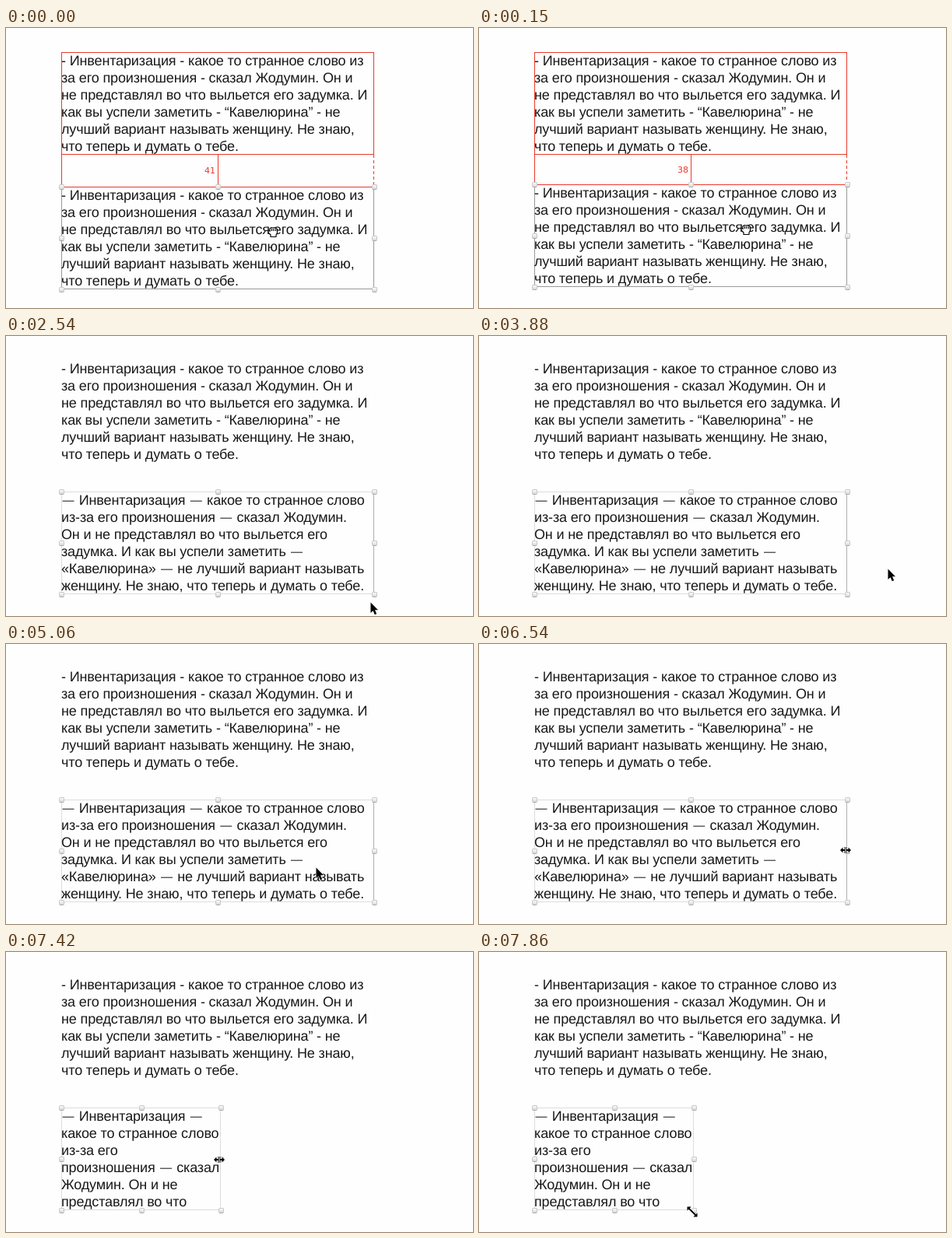
These frames come from a looping animation (600 px wide and 360 px high, 8000 ms). An HTML page:

```html
<!DOCTYPE html>
<html lang="ru">
<head>
<meta charset="utf-8">
<title>Text box</title>
<style>
  html, body { margin: 0; width: 100%; height: 100%; overflow: hidden; background: #fefefe; }
  body { position: relative; }
  body * { box-sizing: border-box; }

  /* Every animated part jumps between states on one shared loop. */
  .box, .frame, .old, .new, .guides, .gap, .gap::after, .cursor, .hand, .arrow, .side, .diag {
    animation: 8s step-end infinite;
  }

  p {
    position: absolute; margin: 0; height: 132px; overflow: hidden;
    font: 18px/22px "Liberation Sans", Arial, sans-serif;
    letter-spacing: -.14px; text-rendering: geometricPrecision; color: #181818;
  }
  p span { white-space: nowrap; }
  p b { position: relative; top: -1px; padding: 0 1.5px; font-weight: 400; font-size: 15px; line-height: 0; }
  .sample { left: 71px; top: 31px; white-space: pre; }
  .box p { left: 0; top: 0; width: calc(100% + 4px); }
  .box .old { white-space: pre; animation-name: old; }
  .box .new { animation-name: new; }

  .box { position: absolute; left: 71px; height: 132px; animation-name: box; }
  .frame { position: absolute; inset: 0; border: 1px solid #ddd; animation-name: frame; }
  .box i {
    position: absolute; width: 7px; height: 7px; margin: -3px;
    border: 1px solid #c8c8c8; border-bottom-color: #aaa; border-radius: 2px;
    background: linear-gradient(#fafafa, #d8d8d8);
  }
  .l { left: 0; } .c { left: 50%; } .r { left: 100%; }
  .t { top: 0; } .m { top: 50%; } .b { top: 100%; }

  .guides { position: absolute; left: 71px; top: 31px; width: 402px; height: 132px;
    border: 1px solid #e8392b; color: #e8392b; animation-name: guides; }
  .gap { position: absolute; left: -1px; top: 131px; width: 402px;
    border-left: 1px solid; animation-name: gap;
    background: repeating-linear-gradient(#e8392b 0 4px, transparent 4px 7px) right / 1px 100% no-repeat; }
  .gap::before { content: ""; position: absolute; left: 200px; top: 0; width: 1px; height: 100%; background: #e8392b; }
  .gap::after { content: "37"; position: absolute; right: 204px; top: 50%; transform: translateY(-50%);
    font: 11px/12px "DejaVu Sans", Verdana, sans-serif; animation-name: label; }

  svg { position: absolute; left: 0; top: 0; }
  .cursor { animation-name: move; }
  .hand { animation-name: hand; }
  .arrow { animation-name: arrow; }
  .side { animation-name: side; }
  .diag { animation-name: diag; }

  @keyframes box {
    0% { top: 204px; width: 402px; }
    1.875% { top: 201px; width: 402px; }
    3.75% { top: 200px; width: 402px; }
    83.625% { top: 200px; width: 309px; }
    85.5% { top: 200px; width: 213px; }
    87.25% { top: 200px; width: 210px; }
    89% { top: 200px; width: 207px; }
    90.875%, 100% { top: 200px; width: 205px; }
  }
  @keyframes frame {
    0% { border-color: #e8392b #999 #999; }
    5.625% { border-color: #ddd #b0b0b0 #ddd #ddd; }
    83.625%, 100% { border-color: #ddd; }
  }
  @keyframes old { 0% { visibility: visible; } 31.75%, 100% { visibility: hidden; } }
  @keyframes new { 0% { visibility: hidden; } 31.75%, 100% { visibility: visible; } }

  @keyframes guides { 0% { visibility: visible; } 5.625%, 100% { visibility: hidden; } }
  @keyframes gap { 0% { height: 42px; } 1.875% { height: 39px; } 3.75%, 100% { height: 38px; } }
  @keyframes label { 0% { content: "41"; } 1.875% { content: "38"; } 3.75%, 100% { content: "37"; } }

  @keyframes hand { 0% { visibility: visible; } 5.625%, 100% { visibility: hidden; } }
  @keyframes arrow {
    0% { visibility: hidden; } 5.625% { visibility: visible; }
    76.25% { visibility: hidden; } 94.5% { visibility: visible; }
    98.25%, 100% { visibility: hidden; }
  }
  @keyframes side {
    0% { visibility: hidden; } 76.25% { visibility: visible; }
    94.5%, 100% { visibility: hidden; }
  }
  @keyframes diag { 0% { visibility: hidden; } 98.25%, 100% { visibility: visible; } }

  @keyframes move {
    0% { transform: translate(343px, 262px); }
    1.875% { transform: translate(343px, 259px); }
    3.75% { transform: translate(343px, 258px); }
    5.625% { transform: translate(378px, 279px); }
    7.5% { transform: translate(440px, 322px); }
    9.375% { transform: translate(468px, 342px); }
    37.375% { transform: translate(488px, 336px); }
    39.25% { transform: translate(512px, 322px); }
    41.125% { transform: translate(530px, 311px); }
    43% { transform: translate(538px, 307px); }
    46.625% { transform: translate(532px, 302px); }
    48.5% { transform: translate(525px, 299px); }
    52.125% { transform: translate(440px, 250px); }
    54% { transform: translate(245px, 196px); }
    55.875% { transform: translate(135px, 235px); }
    57.625% { transform: translate(150px, 305px); }
    59.5% { transform: translate(220px, 340px); }
    61.375% { transform: translate(320px, 325px); }
    63.25% { transform: translate(398px, 287px); }
    65% { transform: translate(431px, 261px); }
    66.875% { transform: translate(440px, 257px); }
    68.75% { transform: translate(449px, 253px); }
    70.625% { transform: translate(456px, 250px); }
    72.5% { transform: translate(463px, 254px); }
    74.375% { transform: translate(468px, 259px); }
    76.25% { transform: translate(474px, 265px); }
    81.75% { transform: translate(471px, 265px); }
    83.625% { transform: translate(378px, 265px); }
    85.5% { transform: translate(282px, 265px); }
    87.25% { transform: translate(279px, 265px); }
    89% { transform: translate(276px, 265px); }
    90.875% { transform: translate(274px, 265px); }
    92.75% { transform: translate(274px, 267px); }
    94.5% { transform: translate(274px, 277px); }
    96.375% { transform: translate(273px, 312px); }
    98.25%, 100% { transform: translate(274px, 334px); }
  }
</style>
</head>
<body>
<p class="sample">- Инвентаризация - какое то странное слово из
за его произношения - сказал Жодумин. Он и
не представлял во что выльется его задумка. И
как вы успели заметить - “Кавелюрина” - не
лучший вариант называть женщину. Не знаю,
что теперь и думать о тебе.</p>

<div class="guides"><div class="gap"></div></div>

<div class="box">
  <div class="frame"></div>
  <p class="old">- Инвентаризация - какое то странное слово из
за его произношения - сказал Жодумин. Он и
не представлял во что выльется его задумка. И
как вы успели заметить - “Кавелюрина” - не
лучший вариант называть женщину. Не знаю,
что теперь и думать о тебе.</p>
  <p class="new"><b>—</b> Инвентаризация&nbsp;<b>—</b> какое то странное слово
    <span>из-за</span> его <span>произношения <b>—</b></span> сказал Жодумин. Он&nbsp;и
    не представлял во что выльется его задумка. И как вы успели <span>заметить <b>—</b></span>
    <span>«Кавелюрина» <b>—</b></span> не лучший вариант называть женщину.
    Не знаю, что теперь и думать о тебе.</p>
  <i class="l t"></i><i class="c t"></i><i class="r t"></i>
  <i class="l m"></i><i class="r m"></i>
  <i class="l b"></i><i class="c b"></i><i class="r b"></i>
</div>

<svg width="600" height="360">
  <g class="cursor" stroke-linejoin="round">
    <g class="hand" fill="#fff" stroke="#000" stroke-width="1.2">
      <path d="M-3 6.5V4L-6 1V-1.5L-4-2V-4L-2-5.5L0-5L2-5.5L3.5-4.5L5.5-3.5V1.5L4 4V6.5Z"/>
      <path d="M-4-2V0M-1.5-4V-1M1-4V-1M3.5-3.5V-1" fill="none"/>
    </g>
    <g class="arrow" stroke="#fff" paint-order="stroke">
      <path d="M.5 .5V14L3.6 11.2L5.8 16.2L8.2 15.2L6 10.2H10Z"/>
    </g>
    <g class="side" stroke="#fff" paint-order="stroke">
      <path d="M-7 0L-3.5-3.5V-1H-1.5V-4H-.5V4H-1.5V1H-3.5V3.5ZM7 0L3.5-3.5V-1H1.5V-4H.5V4H1.5V1H3.5V3.5Z"/>
    </g>
    <g class="diag" stroke="#fff" paint-order="stroke">
      <path d="M-6.5-6.5H-1.5L-3.2-4.6L4.6 3.2L6.5 1.5V6.5H1.5L3.2 4.6L-4.6-3.2L-6.5-1.5Z"/>
    </g>
  </g>
</svg>
</body>
</html>
```
